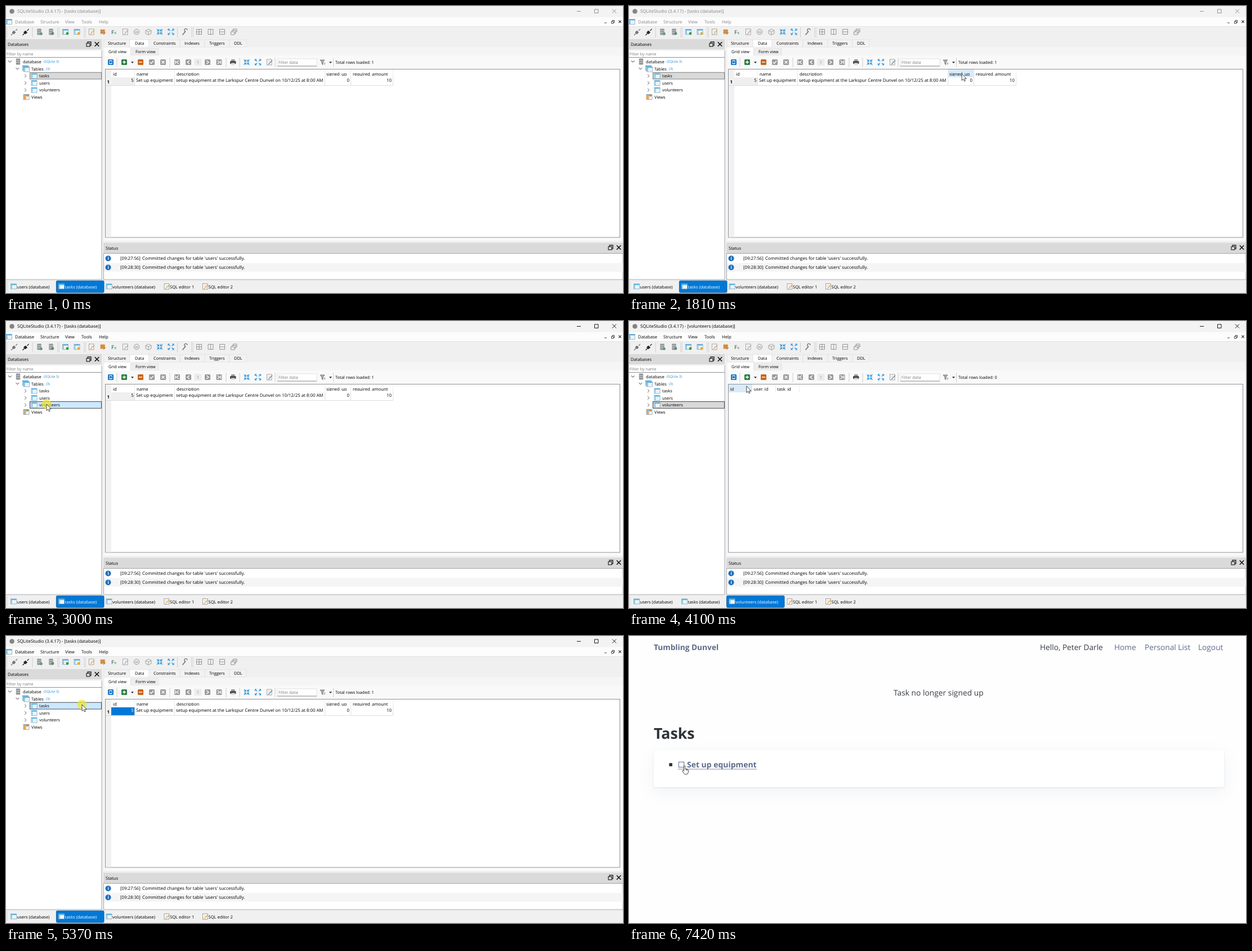
Animation of 1096 by 511 pixels, one loop 8000 ms. Source, as an HTML page:

```html
<!DOCTYPE html>
<html lang="en">
<head>
<meta charset="utf-8">
<title>Task database</title>
<style>
  html, body { margin: 0; width: 100%; height: 100%; overflow: hidden; background: #f0f0f0; }
  svg { display: block; width: 1096px; height: 511px; }
  text { font-family: "Open Sans", "Noto Sans", sans-serif; white-space: pre; text-rendering: geometricPrecision; }
</style>
</head>
<body>
<svg id="stage" viewBox="0 0 1096 511" xmlns="http://www.w3.org/2000/svg"></svg>
<script>
const LOOP = 8000;
const BLUE = '#0078d7', ICON = '#2a95dd', GREY = '#9a9a9a';

// --- drawing helpers ---
const text = (x, y, s, size = 7.85, fill = '#000', more = '') =>
  `<text x="${x}" y="${y}" font-size="${size}" fill="${fill}" ${more}>${s}</text>`;
const rect = (x, y, w, h, fill, more = '') =>
  `<rect x="${x}" y="${y}" width="${w}" height="${h}" fill="${fill}" ${more}/>`;
const line = (d, stroke, w = 1, fill = 'none', more = '') =>
  `<path d="${d}" stroke="${stroke}" stroke-width="${w}" fill="${fill}" ${more}/>`;
const dot = (x, y, r, fill, more = '') => `<circle cx="${x}" cy="${y}" r="${r}" fill="${fill}" ${more}/>`;
const group = (id, body) => `<g id="${id}">${body}</g>`;
const at = (x, y, body) => `<g transform="translate(${x} ${y})">${body}</g>`;
const cross = (x, y, r, color, w) =>
  line(`M${x - r} ${y - r}l${2 * r} ${2 * r}M${x - r} ${y + r}l${2 * r} ${-2 * r}`, color, w);

// --- icons, drawn around their centre ---
const tableIcon = (x, y) => at(x, y,
  rect(-5, -4.5, 10, 9, '#f4fafd', 'stroke="#7f9fb0" stroke-width=".8"') +
  rect(-4.6, -4.1, 9.2, 1.7, '#45b0e6') + rect(-4.6, -2.4, 2.2, 6.5, '#8fd0f0') +
  line('M-2.4 1H4.6M1.2-2V4', '#d5e8f2', .6));
const server = (x, y) => at(x, y,
  rect(-3.7, -5.5, 7.4, 11, '#92979a', 'rx="1"') + line('M-3-2H3M-3 1.5H3', '#d8dcdd', .9));
const page = (x, y, pen = '#e8a33a') => at(x, y,
  rect(-4.5, -5, 8.5, 10, '#fbfbfb', 'stroke="#8d8d8d" stroke-width=".8"') +
  line('M-2.5-2H2M-2.5 0H1', '#bbb', .6) + line('M-2 4L5-3', pen, 1.3));
const badge = (x, y, color) => dot(x, y, 2.4, color);
const box = (x, y, color, mark) => at(x, y,
  rect(-5, -5, 10, 10, color, 'rx="1.5"') + line(mark, '#fff', 1.4));
const ARROWS = {
  out: 'M-2.2-5H-5V-2.2M2.2-5H5V-2.2M-2.2 5H-5V2.2M2.2 5H5V2.2',
  in: 'M-4.4-1.4H-1.4V-4.4M4.4-1.4H1.4V-4.4M-4.4 1.4H-1.4V4.4M4.4 1.4H1.4V4.4'
};
const arrows = (x, y, way) => at(x, y,
  line('M-4.8-4.8L-1.5-1.5M4.8-4.8L1.5-1.5M-4.8 4.8L-1.5 1.5M4.8 4.8L1.5 1.5', ICON, 1.3) +
  line(ARROWS[way], ICON, 1.2));
const windows = (x, y, d) => at(x, y, line('M-4.5-4.5H4.5V4.5H-4.5Z' + d, '#8b8b8b', .9));
const plug = (x, y, c) => at(x, y,
  line('M-5.5 5.5L-2 2M2.5-2.5L5.5-5.5', c, 1.2) + line('M-3.5 .5L-.5-2.5 2.5 .5-.5 3.5Z', c, 1, c));
const seps = (y0, y1, xs) => xs.map(x => line(`M${x} ${y0}V${y1}`, '#c6c6c6', .8)).join('');
const grips = (y0, y1, xs) => xs.map(x => line(`M${x} ${y0}V${y1}`, '#aaa', 1, 'none', 'stroke-dasharray="1 2"')).join('');
const caretDown = (x, y) => `<path d="M${x - 2.5} ${y - 1.2}h5l-2.5 2.8z" fill="#222"/>`;
const info = y => dot(181.5, y, 5, '#1f6fbf') + text(180.4, y + 2.8, 'i', 8, '#fff', 'font-weight="700"');
const dockButtons = (x, y) =>
  line(`M${x - 2} ${y - 1.5}V${y - 4}H${x + 4}V${y + 2}H${x + 2}`, '#222', 1.3) +
  rect(x - 4, y - 1.5, 6, 5.5, 'none', 'stroke="#222" stroke-width="1.2"') + cross(x + 14.5, y, 3.7, '#111', 1.6);

// --- parts of the database window ---
function titleBar() {
  return rect(0, 0, 1096, 20, '#f3f3f3') + rect(0, 20, 1096, 16, '#fcfcfc') +
    dot(10.5, 9.5, 4.3, '#858585') + tableIcon(5.5, 28) +
    group('frameText',
      text(20, 12.3, '', 7.95, 'currentColor', 'id="title"') +
      [[16, 'Database'], [61, 'Structure'], [105, 'View'], [134, 'Tools'], [165, 'Help']]
        .map(([x, s]) => text(x, 30.8, s, 7.75, 'currentColor')).join('') +
      line('M1014 9.5H1021M1045.5 6H1052V12.5H1045.5Z', 'currentColor', .9) +
      cross(1080.5, 9.2, 3.5, 'currentColor', .9)) +
    line('M1063 30H1067M1075.5 27.5H1079V31H1075.5ZM1077 27.5V25.5H1080.5V29.5H1079', '#333', .9) +
    cross(1090.5, 27.8, 2.2, '#333', 1.1);
}

function mainTools() {
  const layouts = ['M0-4.5V4.5M-4.5 0H4.5', 'M0-4.5V4.5', 'M-4.5 0H4.5'];
  return line('M0 36.5H1096', '#e3e3e3') + seps(38, 56, [47, 92, 139, 304.5, 330]) +
    grips(39, 55, [1.5, 94.5, 141.5, 332.5]) +
    plug(14.5, 46.5, '#777') + plug(35, 46.5, '#222') +
    server(59, 46) + badge(62.5, 49.5, '#5a9c6c') + server(80, 46) + badge(83, 49, '#5f8a74') +
    tableIcon(105.5, 46) + badge(109, 49, '#2c9a48') + tableIcon(126, 46) + badge(129, 49, '#e5ac2f') +
    page(152, 46) + rect(167.5, 41.5, 8.5, 8.5, '#e5a55a', 'rx="1"') + line('M168 44H175M168 47H175M173 51l4-4', '#865020', .8) +
    text(187, 49.8, 'F', 9.5, '#397d4a', 'font-weight="600"') + text(192.3, 50.3, 'x', 7.5, '#397d4a') +
    page(212, 46, '#aaa') + dot(232, 46, 4.7, '#f7f7f7', 'stroke="#888" stroke-width=".9"') +
    line('M229 45H235M229 47.5H235', '#777', .8) +
    line('M248 43.5L253 41 258 43.5V49L253 51.5 248 49ZM248 43.5L253 46 258 43.5M253 46V51.5', '#999', .9, '#eee') +
    arrows(273, 46, 'in') + arrows(293, 46, 'out') +
    line('M313.5 51.5L319 45', '#777', 1.7) + line('M319 45.5A2.6 2.6 0 1 1 322 43', '#777', 1.3) +
    layouts.map((d, i) => windows(343 + 20.5 * i, 46, d)).join('') +
    line('M399.5 46H406V51H399.5ZM401.5 46V43.5H408V48.5H406M403.5 43.5V41H410V46H408', '#888', .9);
}

function sidebar() {
  const row = (y, s) => line(`M33 ${y - 2.8}l3 2.8-3 2.8`, '#555', .9) + tableIcon(50, y) + text(59, y + 2.7, s, 7.45);
  return rect(0, 59, 170, 18, '#dadada') + text(3, 70.8, 'Databases', 7.6) + dockButtons(147, 68) +
    rect(0, 79.5, 170, 11.5, '#fff') + line('M0 91.5H170', '#858585', .9) +
    text(1, 87.8, 'Filter by name', 7.2, '#7c7c7c') +
    rect(0, 92, 170, 395, '#fff') + line('M170 79.5V487H0', '#9a9fa5', .9) +
    rect(42, 0, 127.5, 12.6, '#e5f3ff', 'id="rowHover"') +
    rect(42.4, 0, 127, 11.9, '#d9d9d9', 'id="rowPick" stroke="#333" stroke-width=".8"') +
    line('M4 97.3l2.9 2.8 2.9-2.8M17.5 110l2.9 2.8 2.9-2.8', '#333', 1) +
    server(21.5, 99) + text(30, 101.9, 'database', 7.65) + text(67, 101.2, '(SQLite 3)', 6.1, '#1b86d6') +
    tableIcon(34.5, 110.5) + tableIcon(36.5, 112.5) + text(45, 114.7, 'Tables', 7.4) + text(71, 114, '(3)', 6.1, '#1b86d6') +
    row(124.5, 'tasks') + row(137, 'users') + row(149.6, 'volunteers') +
    tableIcon(36, 162) + rect(31, 160, 4.5, 6, '#e5a55a') + rect(36, 157, 4, 4, '#d98c3f') + text(45, 164.8, 'Views', 7.4);
}

function editor() {
  const tabs = [[181, 'Structure'], [229, 'Data'], [262, 'Constraints'], [317, 'Indexes'], [361, 'Triggers'], [405, 'DDL']];
  const edges = [174, 220, 254, 309, 353, 397, 427];
  const nav = ['M-3-3V3M3-3L-1 0 3 3', 'M2-3L-2 0 2 3', 'M-2-3L2 0-2 3', 'M3-3V3M-3-3L1 0-3 3'];
  return rect(173.5, 73, 922.5, 345, '#f5f5f5') +
    edges.slice(0, 6).map((x, i) => rect(x, 60, edges[i + 1] - x, 13, i == 1 ? '#fff' : '#f2f2f2', 'stroke="#dedede" stroke-width=".7"')).join('') +
    tabs.map(([x, s]) => text(x, 69.1, s, 7.45)).join('') +
    rect(175, 74, 45, 14, '#fff') + rect(222, 75.5, 49, 12.5, '#ededed', 'stroke="#dfdfdf" stroke-width=".7"') +
    text(182, 83.8, 'Grid view', 7.4) + text(230, 84.2, 'Form view', 7.4) +
    rect(175, 88, 921, 330, '#f9f9f9') +
    box(186, 100, '#1875c9', 'M-2.5-1A2.6 2.6 0 0 1 2.5-1M2.5 1A2.6 2.6 0 0 1-2.5 1') +
    box(210, 100, '#2e7d45', 'M-3 0H3M0-3V3') + caretDown(224.5, 100.5) + box(239, 100, '#c8641b', 'M-3 0H3') +
    box(259, 100, GREY, 'M-3 0L-1 2.5 3-2.5') + box(279, 100, GREY, 'M-2.5-2.5L2.5 2.5M-2.5 2.5L2.5-2.5') +
    [304, 324, 358, 378.5].map((x, i) => box(x, 100, GREY, nav[i])).join('') +
    rect(334.5, 94, 13, 12, '#ececec') + text(338.8, 103, '1', 7.4, '#888') +
    rect(398, 98, 10.5, 5, '#4c4c4c', 'rx="1"') + rect(400, 95, 6.5, 3, '#999') + rect(400, 101.5, 6.5, 3.5, '#ddd') +
    arrows(427.5, 100, 'in') + arrows(447.5, 100, 'out') + page(468, 100, '#6d8499') +
    seps(92, 109, [197, 291, 391, 415, 478, 581.5]) +
    rect(482, 94, 70, 13, '#fff', 'stroke="#d7d7d7" stroke-width=".7"') + line('M482 107H552', '#888', .9) +
    text(484, 103.2, 'Filter data', 7.4, '#7c7c7c') +
    line('M558 96H566L563 100V104.5L561 103V100Z', '#777', .9, '#aaa') + text(564.5, 105, 'T', 5.5, '#333') + caretDown(576.5, 100.5) +
    text(585, 103.2, '', 7.4, '#000', 'id="total"') +
    rect(176.5, 112.5, 914, 299.5, '#fff', 'stroke="#82878e" stroke-width=".9"');
}

// Header cells are cut just under the baseline.
const header = cells => `<g clip-path="url(#headCut)">${cells.map(([x, s]) => text(x, 123.7, s, 7.7)).join('')}</g>`;
const columns = xs => line(xs.map(x => `M${x} 113V127`).join(''), '#e6e6e6', .8);

function grids() {
  const edges = [228.5, 299.5, 566.5, 612.5, 687.5], end = 'text-anchor="end"';
  return rect(0, 113, 0, 14, '#d9ebf9', 'id="headHover"') +
    group('tasksGrid',
      rect(177, 113, 10, 298.5, '#f1f1f1') + columns(edges) +
      rect(187, 127, 41.5, 14.5, '#efefef', 'id="cell"') +
      line(edges.map(x => `M${x} 127V141.5`).join('') + 'M177 141.5H687.5', '#d6d6d6', .8) +
      header([[190, 'id'], [232, 'name'], [303, 'description'], [569, 'signed_up'], [616, 'required_amount']]) +
      text(179.6, 137.5, '1', 7.85, '#000', 'font-weight="700"') +
      text(226.7, 135.4, '5', 7.85, '#000', 'id="cellText" ' + end) +
      text(231, 135.4, 'Set up equipment', 7.9) +
      text(302, 135.4, 'setup equipment at the Larkspur Centre Dunvel on 10/12/25 at 8:00 AM') +
      text(610, 135.4, '0', 7.85, '#000', end) + text(685, 135.4, '10', 7.85, '#000', end)) +
    group('volGrid', columns([218.5, 260.5, 302.5]) + header([[179.5, 'id'], [221.5, 'user_id'], [263, 'task_id']]));
}

function statusPanel() {
  const message = (y, time) => info(y) + text(203, y + 2.9, `[${time}]`, 7.75) +
    text(242, y + 2.9, "Committed changes for table 'users' successfully.", 8.03);
  return rect(173, 421.5, 923, 18.5, '#dadada') + text(177, 434, 'Status', 7.6) + dockButtons(1074, 430) +
    rect(173.5, 440.5, 922.5, 46.5, '#fff', 'stroke="#9a9fa5" stroke-width=".9"') +
    rect(174, 457.5, 922, 15.5, '#f5f5f5') + message(449.4, '09:27:56') + message(465.4, '09:28:30');
}

function taskTabs() {
  const tab = (x, s, id) => tableIcon(x - 6, 499.3) + text(x, 502.7, s, 7.55, '#000', `id="${id}"`);
  return line('M0 488H1096', '#dcdcdc', .8) + grips(491, 509, [2]) +
    rect(0, 489.2, 0, 20.8, BLUE, 'id="tabPick" rx="2" stroke="#0a5a9c" stroke-width=".9"') +
    tab(19.5, 'users (database)', 'usersTab') + tab(104.5, 'tasks (database)', 'tasksTab') +
    tab(189, 'volunteers (database)', 'volTab') +
    page(285.5, 499.3) + text(291, 502.7, 'SQL editor 1', 7.55) +
    page(354, 499.3) + text(359.5, 502.7, 'SQL editor 2', 7.55);
}

// --- the web page ---
function webPage() {
  const link = '#5d6b89', ink = '#373c44';
  const shade = (dy, o, f) => rect(44, 203 + dy, 1013, 66, '#7c8db0', `opacity="${o}" filter="url(#${f})"`);
  return rect(0, 0, 1096, 511, '#fefefe') +
    text(44, 25, 'Tumbling Dunvel', 13.7, link, 'font-weight="700"') +
    text(730, 25, 'Hello, Peter Darle', 13.7, ink) +
    [[862, 'Home'], [916, 'Personal List'], [1011, 'Logout']].map(([x, s]) => text(x, 25, s, 13.7, link)).join('') +
    text(470, 106, 'Task no longer signed up', 13.8, ink) +
    text(44, 183, 'Tasks', 26.7, '#2d3138', 'font-weight="700"') +
    shade(9, .1, 'soft') + shade(1, .16, 'tight') + rect(44, 203, 1013, 66, '#fff', 'rx="3"') +
    rect(71.3, 226.3, 5.6, 5.6, '#2d3138') +
    rect(88.3, 224.3, 9.4, 9.4, 'none', `stroke="${link}" stroke-width="1"`) +
    text(103, 234, 'Set up equipment', 13.95, link, 'font-weight="700"') +
    line('M87 237H227', '#7f8ba5', 1) +
    line('M226.7 218.5V237.5', '#59657f', 1, 'none', 'id="caret"');
}

const pointer = group('pointer',
  dot(0, 0, 8.5, '#f0e62e', 'id="halo" opacity=".72"') +
  line('M0 0V11.6L2.6 9.2 4.4 13 6.2 12.2 4.5 8.5H8.2Z', '#111', .75, '#fff', 'id="arrow"') +
  line('M-1 1.6A1.2 1.2 0 0 1 1.4 1.6V6.2L5.8 7Q7.3 7.4 7.2 9L6.6 12.6Q6 15.7 3.5 15.7H1.6Q0 15.7-.9 14.2L-3.4 10.4Q-4 9-2.8 8.6-2 8.6-1 9.9Z' +
    'M3 6.6V9M5 7V9.2', '#222', .85, '#fff', 'id="hand"'));

const stage = document.getElementById('stage');
stage.innerHTML = `<defs>
  <clipPath id="headCut"><rect x="177" y="113" width="913" height="11.2"/></clipPath>
  <filter id="soft" x="-10%" y="-100%" width="120%" height="300%"><feGaussianBlur stdDeviation="14"/></filter>
  <filter id="tight" x="-10%" y="-50%" width="120%" height="200%"><feGaussianBlur stdDeviation="1.5"/></filter></defs>` +
  group('app', rect(0, 0, 1096, 511, '#f0f0f0') + titleBar() + mainTools() + sidebar() + editor() + grids() + statusPanel() + taskTabs()) +
  group('web', webPage()) + pointer;

const ui = {};
stage.querySelectorAll('[id]').forEach(e => ui[e.id] = e);
const set = (id, attrs) => { for (const k in attrs) ui[id].setAttribute(k, attrs[k]); };
const show = (id, on) => { ui[id].style.display = on ? '' : 'none'; };

// --- pointer path: time, x, y ---
const PATH = [
  [260, 1056, 512], [300, 1034, 496], [700, 790, 262], [1090, 554, 93], [1300, 550, 135], [1460, 572, 154],
  [1810, 591, 121], [1930, 642, 118], [2200, 470, 134], [2500, 190, 157], [2730, 80, 141], [2800, 72, 148],
  [3380, 72, 148], [3640, 190, 93], [3840, 268, 117], [3930, 265, 131], [4100, 209, 116], [4190, 200, 117],
  [4430, 266, 120], [4600, 248, 138], [4800, 180, 147], [4990, 135, 122], [5610, 135, 122], [5800, 240, 275],
  [5990, 406, 514], [6460, 396, 506], [6820, 235, 325], [7220, 98.5, 230.5], [8000, 98.5, 230.5]
];
const RESTS = [2800, 3380, 4990, 5610, 7220, 8000];

function slope(i, k) {
  if (RESTS.includes(PATH[i][0])) return 0;
  const a = PATH[Math.max(0, i - 1)], b = PATH[Math.min(PATH.length - 1, i + 1)];
  return (b[k] - a[k]) / (b[0] - a[0]);
}

function pointerAt(t) {
  if (t < PATH[0][0]) return [-99, -99];
  const i = Math.min(PATH.length - 2, PATH.findLastIndex(p => p[0] <= t));
  const [a, b] = [PATH[i], PATH[i + 1]], span = b[0] - a[0], u = (t - a[0]) / span;
  return [1, 2].map(k =>
    a[k] * (2 * u ** 3 - 3 * u * u + 1) + b[k] * (3 * u * u - 2 * u ** 3) +
    span * (slope(i, k) * u * (1 - u) ** 2 + slope(i + 1, k) * u * u * (u - 1)));
}

const within = (t, spans) => spans.some(([a, b]) => t >= a && t < b);
const PRESSES = [[3000, 3060], [3110, 3210], [5030, 5110], [5200, 5440], [7320, 7420]];
const HIDDEN = [[0, 300], [5990, 6460]];
const TASK_COLS = [187, 229, 300, 567, 613, 687.5], VOL_COLS = [177, 219, 261, 302.5];
const ROW_TOP = 117.8, ROW = 12.6;

function draw(t) {
  const onWeb = t >= 6260, hidden = within(t, HIDDEN);
  const [x, y] = hidden ? [-99, -99] : pointerAt(t);
  const onLink = onWeb && x > 86 && x < 228 && y > 218 && y < 240;
  const volunteers = t >= 3160 && t < 5280;
  const name = volunteers ? 'volunteers' : 'tasks';

  show('app', !onWeb);
  show('web', onWeb);
  show('pointer', !hidden);
  show('hand', onLink);
  show('arrow', !onLink);
  show('halo', within(t, PRESSES));
  show('caret', t < 6960);
  set('pointer', { transform: `translate(${x.toFixed(2)} ${y.toFixed(2)})` });
  if (onWeb) return;

  ui.frameText.style.color = t < 3000 ? '#858585' : '#000';
  ui.title.textContent = `SQLiteStudio (3.4.17) - [${name} (database)]`;
  ui.total.textContent = `Total rows loaded: ${volunteers ? 0 : 1}`;
  show('tasksGrid', !volunteers);
  show('volGrid', volunteers);
  set('tabPick', volunteers ? { x: 173.4, width: 102.6 } : { x: 89.4, width: 84.6 });
  set('tasksTab', { fill: volunteers ? '#000' : '#fff' });
  set('volTab', { fill: volunteers ? '#fff' : '#000' });
  set('cell', { fill: t < 5280 ? '#efefef' : BLUE });
  set('cellText', { fill: t < 5280 ? '#000' : '#fff' });

  // Tree rows: 0 tasks, 1 users, 2 volunteers
  const picked = t >= 3000 && t < 5030 ? 2 : 0;
  const row = x >= 42 && x < 170 ? Math.floor((y - ROW_TOP) / ROW) : -1;
  set('rowPick', {
    y: ROW_TOP + .4 + ROW * picked,
    fill: row === picked ? '#cce8ff' : '#d9d9d9',
    stroke: t < 3000 ? '#666' : '#222'
  });
  show('rowHover', row >= 0 && row < 3 && row !== picked);
  set('rowHover', { y: ROW_TOP + ROW * row });

  const cols = volunteers ? VOL_COLS : TASK_COLS;
  const col = y >= 113 && y < 127 ? cols.findLastIndex(c => c <= x) : -1;
  const over = col >= 0 && col < cols.length - 1;
  show('headHover', over);
  if (over) set('headHover', { x: cols[col], width: cols[col + 1] - cols[col] });
}

function tick() {
  draw(performance.now() % LOOP);
  requestAnimationFrame(tick);
}
tick();
</script>
</body>
</html>
```
